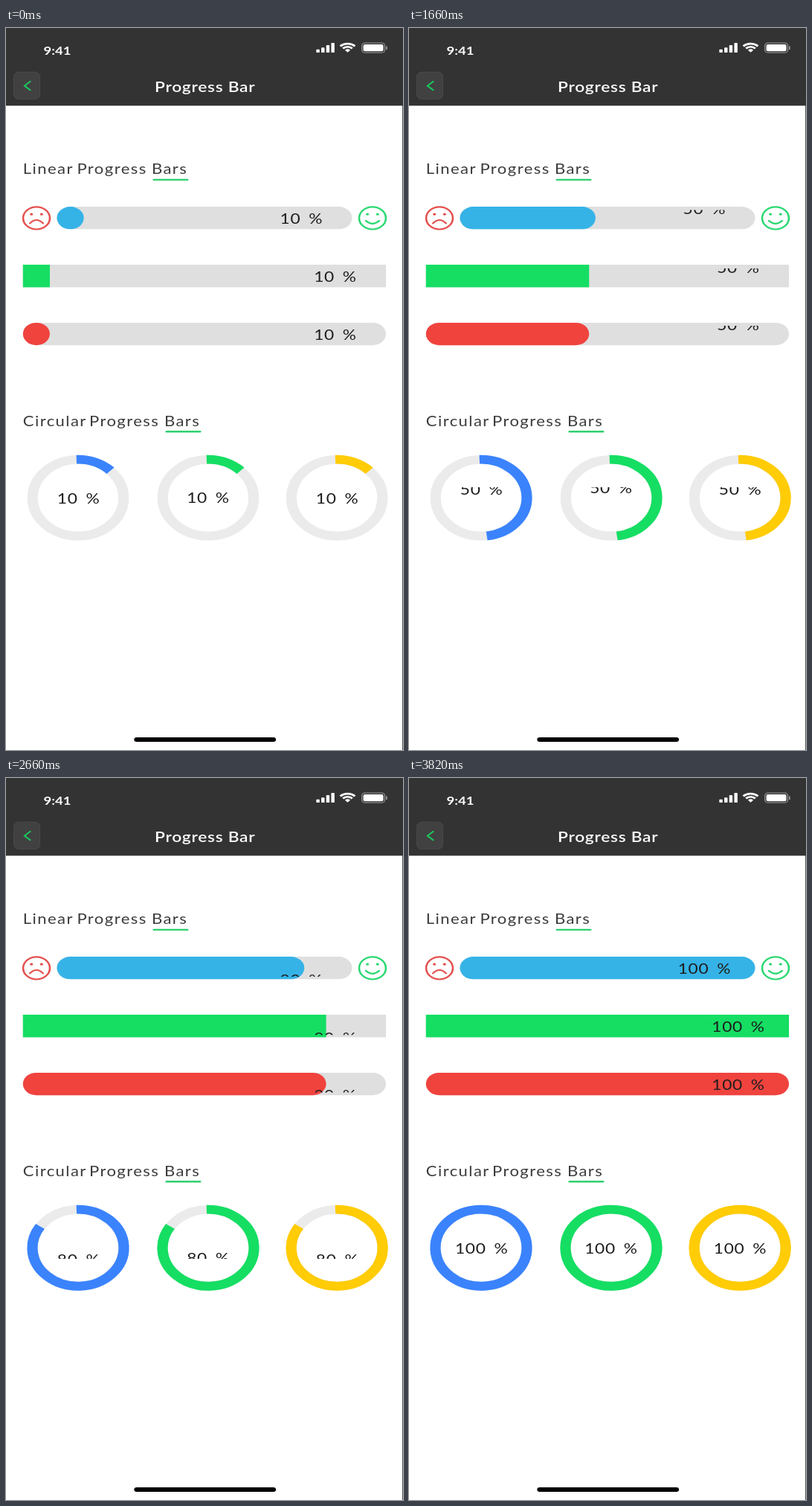
An HTML page that plays this animation: 534 by 970 pixels, repeating every 3840 ms.

```html
<!DOCTYPE html>
<html lang="en">
<head>
<meta charset="utf-8">
<title>Progress Bar</title>
<style>
  html, body { margin: 0; width: 100%; height: 100%; overflow: hidden; background: #fff; }
  #stage { display: block; width: 100%; height: 100%; font-family: Lato, "Open Sans", sans-serif; }
  .heading { font-size: 15.5px; letter-spacing: 1px; fill: #3c3c3c; }
  .value { font-size: 16px; letter-spacing: .5px; word-spacing: 3px; text-anchor: middle; fill: #1d1d1d; }
  .face { fill: none; stroke-width: 1.8; stroke-linecap: round; }
  .arc { fill: none; stroke-width: 10; }
</style>
</head>
<body>
<svg id="stage" viewBox="0 0 375 812" preserveAspectRatio="none">
  <rect width="375" height="812" fill="#fff"/>
  <rect x="374.3" width=".7" height="812" fill="#555"/>

  <rect width="375" height="87.4" fill="#333"/>
  <text x="35.4" y="30.2" font-size="13" font-weight="700" fill="#fff">9:41</text>
  <g id="signal" fill="#fff"></g>
  <g transform="translate(322.7 27.4)" fill="none" stroke="#fff" stroke-width="2.2">
    <path d="M-6.9 -6.9A9.8 9.8 0 0 1 6.9 -6.9"/>
    <path d="M-4.4 -4.4A6.2 6.2 0 0 1 4.4 -4.4"/>
    <path d="M0 0L-2.5 -2.5A3.6 3.6 0 0 1 2.5 -2.5Z" fill="#fff" stroke="none"/>
  </g>
  <rect x="336.2" y="16.9" width="21.6" height="10.8" rx="2.7" fill="none" stroke="#8a8a8a"/>
  <rect x="337.5" y="18.5" width="18.9" height="7.6" rx="1.5" fill="#fff"/>
  <rect x="358.9" y="20.4" width="1.2" height="4" rx=".6" fill="#999"/>

  <rect x="7.4" y="49.6" width="24.6" height="30.4" rx="5" fill="#414141" stroke="#4c4c4c" stroke-width=".7"/>
  <path d="M23.3 59.8L17.5 65L23.3 70.2" fill="none" stroke="#17d05f" stroke-width="1.5"/>
  <text x="188" y="72" font-size="16" font-weight="600" letter-spacing=".5" text-anchor="middle" fill="#fff">Progress Bar</text>

  <text class="heading" y="164"><tspan x="16">Linear</tspan> <tspan x="67">Progress</tspan> <tspan x="137.6">Bars</tspan></text>
  <rect x="138.7" y="169.7" width="33.7" height="2" rx="1" fill="#2ecf70"/>
  <text class="heading" y="447.8"><tspan x="16">Circular</tspan> <tspan x="78.6">Progress</tspan> <tspan x="149.5">Bars</tspan></text>
  <rect x="150.6" y="452.9" width="33.7" height="2" rx="1" fill="#2ecf70"/>

  <g id="faces"></g>
  <g id="meters"></g>
  <rect x="121" y="797.8" width="134" height="5" rx="2.5" fill="#000"/>
</svg>
<script>
const LOOP = 3840, START = 688, END = 3088;   // ms
const STEP = 30.7;                            // distance between rolling values
const BAR_H = 25.4, RING_Y = 528.4;

const bars = [
  { x: 48.1, y: 200.9, w: 278.8, r: 12.7, color: '#35b3e7', labelX: 279.1, base: 220.2 },
  { x: 16, y: 266.2, w: 342.9, r: 0, color: '#15de63', labelX: 311.1, base: 285.8 },
  { x: 16, y: 331.4, w: 342.9, r: 12.7, color: '#f0433e', labelX: 311.1, base: 350.4 }
];
const rings = [
  { x: 68.1, color: '#3a83fd', labelX: 68.6, lift: 0 },
  { x: 191, color: '#15de63', labelX: 191, lift: 1.4 },
  { x: 312.6, color: '#ffcc05', labelX: 312.9, lift: 0 }
];

const meters = document.getElementById('meters');
const strips = [];

function add(parent, tag, attrs) {
  const el = document.createElementNS('http://www.w3.org/2000/svg', tag);
  for (const key in attrs) el.setAttribute(key, attrs[key]);
  return parent.appendChild(el);
}

// A clipped window over a column of values, 10 % to 100 %.
function addCounter(x, base, above, below, lift = 0) {
  const view = add(meters, 'svg', { x: x - 40, y: base - above, width: 80, height: above + below });
  const strip = add(view, 'g', {});
  for (let k = 0; k < 10; k++) {
    const y = above - k * STEP - (k < 9 ? lift : 0);
    add(strip, 'text', { class: 'value', x: 40, y }).textContent = `${(k + 1) * 10} %`;
  }
  strips.push(strip);
}

function addFace(x, color, mouth) {
  const g = add(document.getElementById('faces'), 'g',
    { class: 'face', stroke: color, transform: `translate(${x} 213.8)` });
  add(g, 'circle', { r: 12.6 });
  for (const side of [-1, 1]) {
    add(g, 'circle', { cx: side * 4.8, cy: -4.4, r: 1.4, fill: color, stroke: 'none' });
  }
  add(g, 'path', { d: mouth });
}

[3.6, 5.6, 8.4, 10.9].forEach((h, i) =>
  add(document.getElementById('signal'), 'rect',
    { x: 293.1 + i * 4.7, y: 27.6 - h, width: 3.1, height: h, rx: .7 }));

addFace(28.8, '#e4504d', 'M-6.2 5.8Q0 -1.4 6.2 5.8');
addFace(346.2, '#2ad872', 'M-6.3 3Q0 9.4 6.3 3');

for (const b of bars) {
  const box = { x: b.x, y: b.y, width: b.w, height: BAR_H, rx: b.r };
  add(meters, 'rect', { ...box, fill: '#dfdfdf' });
  b.fill = add(meters, 'rect', { ...box, fill: b.color });
  addCounter(b.labelX, b.base, 15.5, 3.3);
}

for (const r of rings) {
  add(meters, 'circle', { class: 'arc', cx: r.x, cy: RING_Y, r: 43, stroke: '#ebebeb' });
  r.arc = add(meters, 'circle', {
    class: 'arc', cx: r.x, cy: RING_Y, r: 43.2, stroke: r.color,
    pathLength: 360, transform: `rotate(-92 ${r.x} ${RING_Y})`
  });
  addCounter(r.labelX, 535.3, 18.8, 5.5, r.lift);
}

function draw() {
  const t = performance.now() % LOOP;
  const p = Math.min(1, Math.max(0, (t - START) / (END - START)));
  const mix = (a, b) => a + (b - a) * p;
  for (const b of bars) b.fill.setAttribute('width', mix(BAR_H, b.w));
  for (const r of rings) r.arc.setAttribute('stroke-dasharray', `${Math.min(360, mix(47, 362))} 400`);
  for (const s of strips) s.setAttribute('transform', `translate(0 ${mix(0, 9 * STEP)})`);
  requestAnimationFrame(draw);
}
draw();
</script>
</body>
</html>
```
